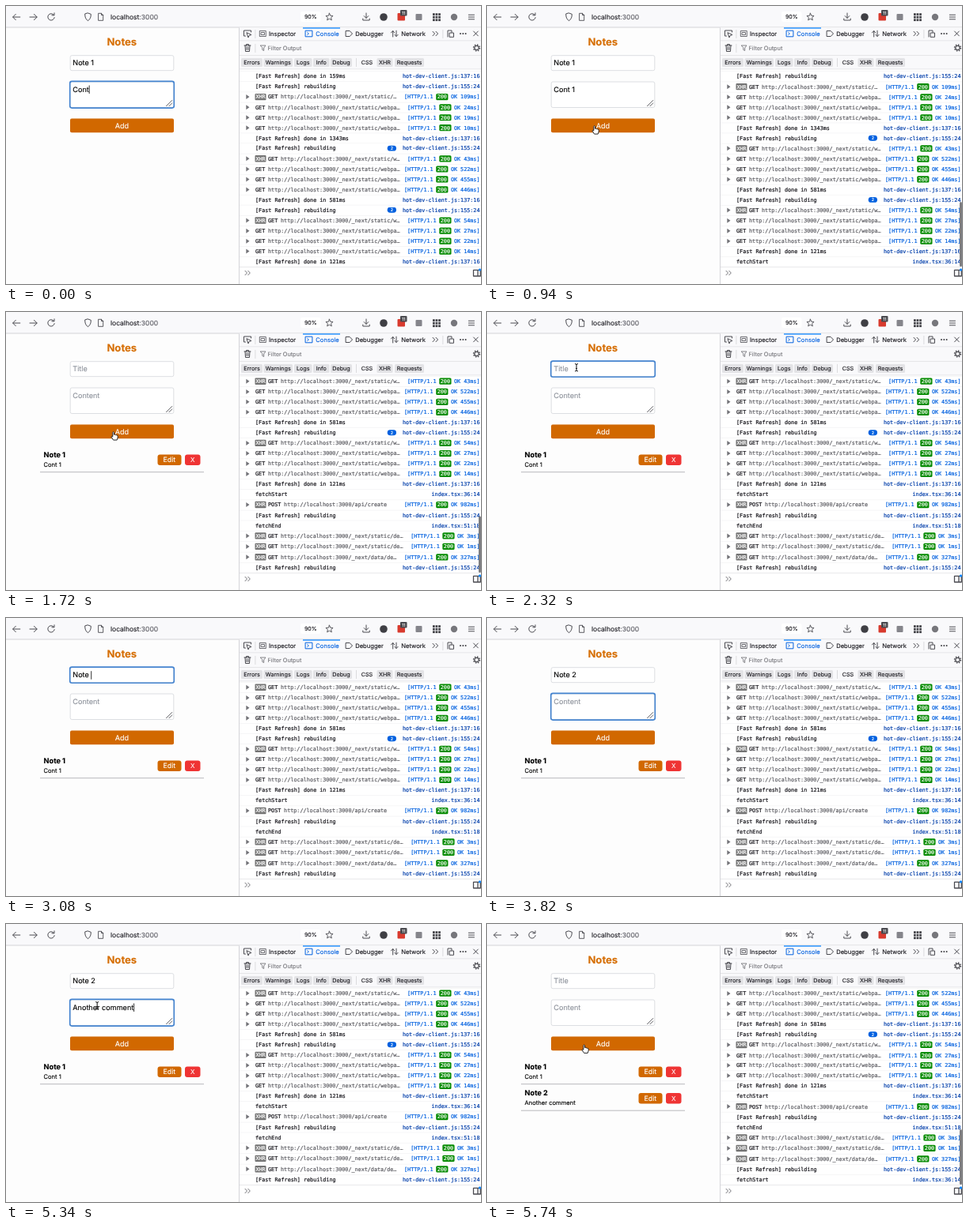
Animation, 600 px wide and 352 px high, one loop 5760 ms. Source, as an HTML page:

```html
<!DOCTYPE html>
<html lang="en">
<head>
<meta charset="utf-8">
<title>Notes</title>
<style>
html, body { margin: 0; width: 100%; height: 100%; overflow: hidden; background: #fdfdfd; }
svg { display: block; width: 600px; height: 352px; }
text { font-family: Inter, "Open Sans", sans-serif; white-space: pre; text-rendering: geometricPrecision; stroke: currentColor; stroke-width: .12; }
.mono text { font-family: "DejaVu Sans Mono", monospace; font-size: 6.75px; stroke-width: .2; }
.line { fill: none; stroke: #4a4a50; stroke-width: 1; stroke-linecap: round; stroke-linejoin: round; }
</style>
</head>
<body>
<svg id="stage" viewBox="0 0 600 352" xmlns="http://www.w3.org/2000/svg">
  <defs><clipPath id="logArea"><rect x="295" y="80" width="305" height="250"/></clipPath></defs>
</svg>
<script>
const LOOP = 5760, CHAR = 6.75 * 0.602;
const ORANGE = '#d16800', BLUE = '#0060df';
const stage = document.getElementById('stage');

function add(parent, tag, attrs = {}, content) {
  const el = document.createElementNS('http://www.w3.org/2000/svg', tag);
  for (const key in attrs) el.setAttribute(key, attrs[key]);
  if (content !== undefined) el.textContent = content;
  parent.appendChild(el);
  return el;
}
const group = (parent, attrs) => add(parent, 'g', attrs);
const rect = (p, x, y, width, height, fill, rx = 0, more = {}) =>
  add(p, 'rect', { x, y, width, height, fill, rx, ...more });
const label = (p, x, y, content, size, fill = '#15141a', more = {}) =>
  add(p, 'text', { x, y, 'font-size': size, fill, color: fill, ...more }, content);
const line = (p, d, more = {}) => add(p, 'path', { d, class: 'line', ...more });
const dot = (p, cx, cy, r, fill, more = {}) => add(p, 'circle', { cx, cy, r, fill, ...more });
const show = (el, on) => el.setAttribute('visibility', on ? 'visible' : 'hidden');
const middle = { 'text-anchor': 'middle' };
const toEnd = { 'text-anchor': 'end' };

function drawBrowserBar() {
  const g = group(stage);
  rect(g, 0, 0, 600, 27, '#f9f9fb');
  rect(g, 0, 26.5, 600, 1, '#d4d4d8');
  line(g, 'M17.8 14H8.8M12.3 10.3L8.6 14L12.3 17.7');
  line(g, 'M30 14H39M35.5 10.3L39.2 14L35.5 17.7');
  line(g, 'M60.3 11.2A4.2 4.2 0 1 0 61.2 14.6M61 8.8V11.8H58');
  line(g, 'M103.5 9L107.3 10.3C107.3 14.5 106.2 17 103.5 18.6C100.8 17 99.7 14.5 99.7 10.3Z');
  line(g, 'M117 9.3H120.5L122.7 11.5V18.3H117ZM120.5 9.3V11.5H122.7', { style: 'stroke-width:.9' });
  const url = label(g, 132, 17, '', 8.5);
  add(url, 'tspan', {}, 'localhost');
  add(url, 'tspan', { fill: '#5b5b62', color: '#5b5b62' }, ':3000');
  rect(g, 372, 7, 25.5, 13, '#fff', 2);
  label(g, 384.7, 16.3, '90%', 7, '#15141a', middle);
  let star = '';
  for (let i = 0; i < 10; i++) {
    const a = -Math.PI / 2 + i * Math.PI / 5, r = i % 2 ? 2.2 : 4.8;
    star += (i ? 'L' : 'M') + (408.5 + r * Math.cos(a)) + ' ' + (14 + r * Math.sin(a));
  }
  line(g, star + 'Z', { style: 'stroke-width:.9' });
  line(g, 'M455 9V15.3M452.2 12.6L455 15.4L457.8 12.6M450.8 16V18H459.2V16');
  dot(g, 477, 14, 4.8, '#3f3f44');
  rect(g, 494.5, 9, 9.5, 9.5, '#d83a2e', 1);
  rect(g, 498, 5, 8.5, 7.5, '#4a4a4f', 1);
  label(g, 502.2, 10.9, '11', 5.5, '#fff', middle);
  rect(g, 517.5, 10, 8, 8, '#85858b', 1);
  for (let i = 0; i < 9; i++) rect(g, 539 + i % 3 * 3.6, 9.2 + Math.floor(i / 3) * 3.6, 2.7, 2.7, '#3f3f44');
  dot(g, 566, 14, 4.2, '#77777c');
  line(g, 'M584.3 11.2H591.5M584.3 14H591.5M584.3 16.8H591.5');
}

function drawDevtools() {
  const g = group(stage);
  rect(g, 295, 27.5, 305, 325, '#fff');
  rect(g, 295, 27.5, 305, 52, '#f9f9fb');
  rect(g, 294, 27.5, 1, 325, '#d4d4d8');
  for (const y of [43.5, 62, 79.5]) rect(g, 295, y, 305, 0.8, '#e0e0e3');
  rect(g, 295, 330, 305, 0.8, '#e4e4e7');

  line(g, 'M302.5 38H300.5V31H309.5V33M304 34L306 40L307 37.5L309.6 36.6Z');
  rect(g, 314.5, 30, 0.8, 11, '#d4d4d8');
  line(g, 'M320.7 31.5H328.3V38.5H320.7ZM322.5 33.5H326.5V36.5H322.5Z', { style: 'stroke-width:.8' });
  label(g, 332, 38, 'Inspector', 7.7);
  rect(g, 375, 27.3, 47, 1.3, '#0a84ff');
  line(g, 'M378.5 31.2H386.9V38.8H378.5ZM380.7 33.5L382.3 35L380.7 36.5', { style: `stroke:${BLUE}` });
  label(g, 391.3, 38, 'Console', 7.6, BLUE);
  line(g, 'M429.5 31.5H434.2L437.5 35L434.2 38.5H429.5Z');
  label(g, 441.2, 38, 'Debugger', 7.6);
  line(g, 'M488.7 39V31.5L486.5 33.8M488.7 31.5L490.7 33.8M493 31.2V38.5L491 36.3M493 38.5L495.2 36.3');
  label(g, 499.2, 38, 'Network', 7.7);
  line(g, 'M539 32.3L541.6 35L539 37.7M543 32.3L545.6 35L543 37.7');
  rect(g, 551.5, 30, 0.8, 11, '#d4d4d8');
  line(g, 'M558 39V31H563V33.5M560.5 34H565.5V39.3H560.5Z');
  for (const x of [574, 577.3, 580.6]) dot(g, x, 35, 1, '#3f3f44');
  line(g, 'M590.6 32L596.3 37.8M596.3 32L590.6 37.8');

  line(g, 'M301 50H309M303.5 50V48.5H306.5V50M302 50L302.5 57.5H307.5L308 50M304 52V55.5M306 52V55.5');
  rect(g, 314.5, 48, 0.8, 11, '#d4d4d8');
  line(g, 'M321.5 50H328L325.7 53V56.5L323.8 55.5V53Z', { style: 'stroke:#77777c;stroke-width:.9' });
  label(g, 330.5, 56, 'Filter Output', 7.3, '#737378');
  dot(g, 594.5, 53, 2.7, 'none', { stroke: '#4a4a50', 'stroke-width': 1.2 });
  dot(g, 594.5, 53, 4, 'none', { stroke: '#4a4a50', 'stroke-width': 1.4, 'stroke-dasharray': '1.5 1.64' });

  const filters = [[297, 27, 'Errors'], [325.5, 36.5, 'Warnings'], [364, 22.5, 'Logs'], [388, 20.5, 'Info'],
    [410, 27, 'Debug'], [447, 18, 'CSS'], [468.5, 20, 'XHR'], [491, 37, 'Requests']];
  for (const [x, w, name] of filters) {
    if (name !== 'CSS') rect(g, x, 66, w, 11, '#e3e3e6', 1.5);
    label(g, x + w / 2, 74.2, name, 7.2, '#15141a', middle);
  }
  rect(g, 442, 66, 0.8, 11, '#d4d4d8');

  line(g, 'M302 335.3L304.5 338L302 340.7M305.8 335.3L308.3 338L305.8 340.7', { style: 'stroke:#77777c' });
  line(g, 'M590.5 334.3H599.3V342H590.5ZM596 334.3V342', { style: 'stroke-width:1.3' });
  rect(g, 597, 332.5, 3, 3, '#0a84ff', 1);
}

// Console entries: logs carry a source place, requests a method and timing.
const log = (text, place, count) => ({ text, place, count });
const refresh = ms => log(`[Fast Refresh] done in ${ms}ms`, 'hot-dev-client.js:137:16');
const rebuild = count => log('[Fast Refresh] rebuilding', 'hot-dev-client.js:155:24', count);
const request = (ms, path = '_next/static/webpa…', xhr = false, method = 'GET') => ({ ms, path, xhr, method });
const xhr = (ms, path, method) => request(ms, path, true, method);
const pages = (...times) => times.map(ms => request(ms));
const entries = [
  request(12), refresh(159), rebuild(),
  xhr(109, '_next/static/…'), ...pages(24, 19, 10), refresh(1343), rebuild(2),
  xhr(43, '_next/static/w…'), ...pages(522, 455, 446), refresh(581), rebuild(2),
  xhr(54, '_next/static/w…'), ...pages(27, 22, 14), refresh(121),
  log('fetchStart', 'index.tsx:36:14'),
  xhr(982, 'api/create', 'POST'), rebuild(),
  log('fetchEnd', 'index.tsx:51:18'),
  xhr(3, '_next/static/de…'), xhr(1, '_next/static/de…'), xhr(327, '_next/data/de…'), rebuild(),
  log('fetchStart', 'index.tsx:36:14'),
];
const FIRST_LAST = 19;
const arrivals = [900, 980, 1000, 1440, 1480, 1480, 1540, 1560, 5700];
let postStatus;

// Rows with a badge are slightly taller than the others.
const rowHeight = entry => entry.xhr ? 13.45 : 12.95;
let listHeight = 0;
for (const entry of entries) {
  entry.center = listHeight + rowHeight(entry) / 2;
  listHeight += rowHeight(entry);
  entry.bottom = listHeight;
}

function drawEntry(parent, entry) {
  const g = group(parent, { transform: `translate(0 ${entry.center})` });
  rect(g, 295, -6.5, 305, 0.6, '#f0f0f2');
  const base = 2.4;
  if (entry.text) {
    label(g, 315, base, entry.text, 6.75);
    label(g, 598.5, base, entry.place, 6.75, '#003eaa', toEnd);
    if (entry.count) {
      rect(g, 481.7, -3.4, 11.3, 6.9, BLUE, 3.4);
      label(g, 487.3, 2, entry.count, 6, '#fff', { ...middle, style: 'font-size:5.5px' });
    }
    return g;
  }
  add(g, 'path', { d: 'M303.3 -3L307.5 0L303.3 3Z', fill: '#737378' });
  let x = 315;
  if (entry.xhr) {
    rect(g, 314.5, -4.2, 14, 8.4, '#737373', 1);
    label(g, 315.4, base, 'XHR', 6.75, '#fff');
    x = 331;
  }
  label(g, x, base, entry.method, 6.75);
  x += (entry.method.length + 1) * CHAR - 0.2;
  label(g, x, base, 'http://localhost:3000/' + entry.path, 6.75, '#5c5c62');
  const status = group(g);
  const tail = `OK ${entry.ms}ms]`, left = 598.5 - tail.length * CHAR;
  label(status, 598.5, base, tail, 6.75, BLUE, toEnd);
  rect(status, left - 18.7, -4.1, 15.2, 8.2, '#058b00', 1.5);
  label(status, left - 17.2, base, '200', 6.75, '#fff');
  label(status, left - 22.3, base, '[HTTP/1.1', 6.75, BLUE, toEnd);
  if (entry.method === 'POST') postStatus = status;
  return g;
}

function makeField(y, height, placeholder) {
  const g = group(stage);
  rect(g, 81.2, y, 130.6, height, '#fff', 2, { stroke: '#dcdee2' });
  const ring = rect(g, 80.7, y - 0.6, 131.6, height + 1.2, 'none', 2.5, { stroke: '#4484d0', 'stroke-width': 1.6 });
  const hint = label(g, 84.3, y + 12.6, placeholder, 9.1, '#8d929b');
  const value = label(g, 84.3, y + 12.6, '', 9.1, '#000');
  const caret = rect(g, 0, y + 4.5, 0.8, 10.5, '#000');
  return (text, focused, blinkOn) => {
    show(ring, focused);
    show(hint, !text);
    value.textContent = text;
    show(caret, focused && blinkOn);
    caret.setAttribute('x', 84.3 + (text ? value.getComputedTextLength() : 0));
  };
}

function drawNote(y, title, body) {
  const g = group(stage, { transform: `translate(0 ${y})` });
  label(g, 47.5, 7.2, title, 9.2, '#000', { 'font-weight': 700 });
  label(g, 47.5, 19, body, 7.6, '#000');
  rect(g, 191.5, 4, 30, 13.4, ORANGE, 3);
  label(g, 206.4, 13.9, 'Edit', 8.8, '#fff', middle);
  rect(g, 226, 4, 19.5, 13.4, '#ef3434', 3);
  label(g, 235.7, 13.7, 'X', 8, '#fff', middle);
  rect(g, 43, 25.7, 207, 1, '#b9b9bd');
  return g;
}

drawBrowserBar();
drawDevtools();
const logView = group(stage, { 'clip-path': 'url(#logArea)' });
const logRows = group(logView, { class: 'mono' });
const rows = entries.map(entry => drawEntry(logRows, entry));
const scrollbar = rect(logView, 597, 0, 3, 82, '#7d7d80', 1.5);

label(stage, 146.3, 49.7, 'Notes', 13.1, '#d66f06', { ...middle, 'font-weight': 700 });
const setTitle = makeField(62.7, 19, 'Title');
const setContent = makeField(96, 32.5, 'Content');
line(stage, 'M202.5 126.7L209.7 119.5M206 126.7L209.7 123', { style: 'stroke-width:.9' });
rect(stage, 81, 142.5, 131, 17.8, ORANGE, 2);
label(stage, 146.5, 154.7, 'Add', 9.1, '#fff', middle);
const notes = [drawNote(176.5, 'Note 1', 'Cont 1'), drawNote(210, 'Note 2', 'Another comment')];
const buildBadge = rect(stage, 246.5, 329, 19, 17.5, '#000', 2);

const cursors = {
  arrow: add(stage, 'path', { d: 'M-2 -5V5L.3 3L2 6.3L3.4 5.6L1.8 2.5H5Z', fill: '#000', stroke: '#fff', 'stroke-width': 0.7 }),
  beam: add(stage, 'path', { d: 'M-2 -4.7Q0 -4.7 0 -3.3Q0 -4.7 2 -4.7M0 -3.3V3.3M-2 4.7Q0 4.7 0 3.3Q0 4.7 2 4.7M-1 1.2H1', fill: 'none', stroke: '#111', 'stroke-width': 1 }),
  hand: add(stage, 'path', { d: 'M-2.2 1V-4.2Q-1.3 -5.6 -.5 -4.2V-1.2Q.6 -1.9 1.2 -.9Q2.2 -1.4 2.7 -.4Q4.2 -.6 4.2 .8V2.5L3.2 5.6H-1.4L-4 1.8Q-4 .3 -2.2 1.4Z', fill: '#fff', stroke: '#111', 'stroke-width': 0.9, 'stroke-linejoin': 'round' }),
};

// Pointer travels as [start, from, moveStart, moveEnd, to, end].
const travels = [
  [480, [113, 110], 520, 800, [137, 156.5], 1800],
  [1800, [137, 156.5], 1800, 2040, [113, 70.3], 2460],
  [5240, [113, 90], 5270, 5520, [124, 157.8], LOOP],
];
function drawPointer(t) {
  Object.values(cursors).forEach(c => show(c, false));
  const trip = travels.find(([start, , , , , end]) => t >= start && t < end);
  if (!trip) return;
  const [, from, begin, finish, to] = trip;
  const p = Math.min(1, Math.max(0, (t - begin) / (finish - begin)));
  const k = p * p * (3 - 2 * p);
  const [x, y] = from.map((v, i) => v + (to[i] - v) * k);
  const inside = (top, bottom) => x > 81 && x < 212 && y > top && y < bottom;
  const kind = inside(142, 161) ? 'hand' : inside(62, 82) || inside(96, 129) ? 'beam' : 'arrow';
  cursors[kind].setAttribute('transform', `translate(${x} ${y})`);
  show(cursors[kind], true);
}

function typed(text, start, step, t) {
  const count = Math.min(text.length, Math.max(0, Math.floor((t - start) / step) + 1));
  return { text: text.slice(0, count), last: count ? start + (count - 1) * step : -Infinity };
}

function drawForm(t) {
  let title = '', content = '', focus = null, since = 0;
  if (t < 1380) {
    title = 'Note 1';
    const entry = typed('Cont 1', -240, 80, t);
    content = entry.text;
    since = entry.last;
    if (t < 880) focus = 'content';
  } else if (t >= 2060 && t < 5720) {
    const first = typed('Note 2', 2560, 120, t);
    const second = typed('Another comment', 3960, 84, t);
    title = first.text;
    content = second.text;
    focus = t < 3500 ? 'title' : t < 5660 ? 'content' : null;
    since = t < 3500 ? Math.max(2060, first.last) : Math.max(3500, second.last);
  }
  const blinkOn = Math.floor((t - since) / 240) % 2 === 0;
  setTitle(title, focus === 'title', blinkOn);
  setContent(content, focus === 'content', blinkOn);
  show(notes[0], t >= 1500);
  show(notes[1], t >= 5730);
}

function drawLog(t) {
  const past = arrivals.filter(at => at <= t);
  const last = FIRST_LAST + past.length;
  logRows.setAttribute('transform', `translate(0 ${330 - entries[last].bottom})`);
  rows.forEach((row, i) => show(row, i <= last));
  show(postStatus, last >= 21 && t >= 1440);
  const idle = past.length ? t - past[past.length - 1] : Infinity;
  const height = 82 - 1.5 * (last - 20);
  scrollbar.setAttribute('opacity', Math.min(1, Math.max(0, (380 - idle) / 120)));
  scrollbar.setAttribute('y', 330 - height);
  scrollbar.setAttribute('height', height);
}

function drawBuild(t) {
  const level = (start, end) => Math.min(1, Math.max(0, Math.min((t - start) / 50, (end - t) / 50)));
  const shown = Math.max(level(1000, 1401), level(1560, 1720));
  buildBadge.setAttribute('opacity', shown);
  buildBadge.setAttribute('y', 323 + 6 * (1 - shown));
}

function draw(t) {
  drawForm(t);
  drawLog(t);
  drawBuild(t);
  drawPointer(t);
}

const began = performance.now();
function tick() {
  draw((performance.now() - began) % LOOP);
  requestAnimationFrame(tick);
}
tick();
</script>
</body>
</html>
```
